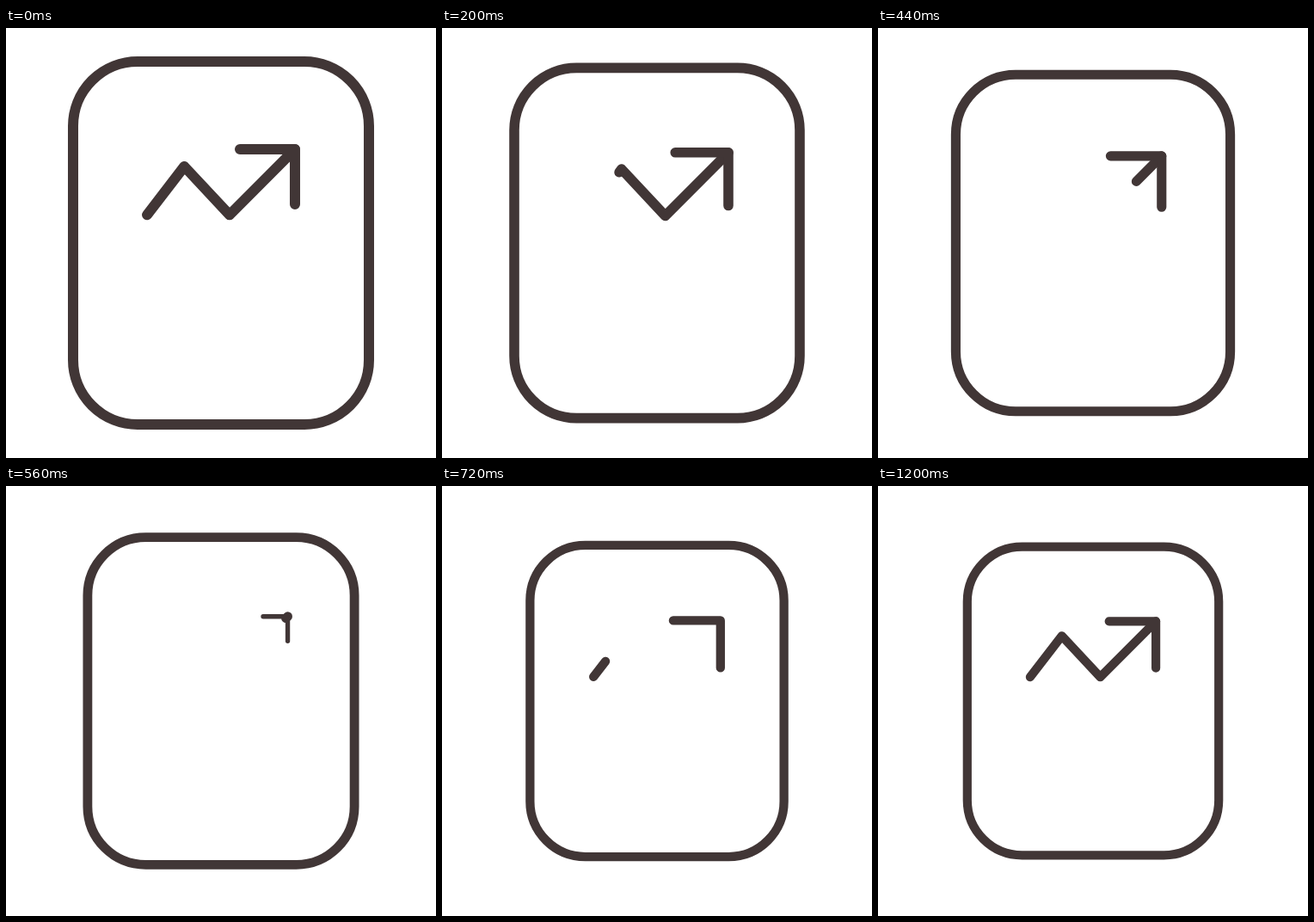
An HTML page that plays this animation: 500 by 500 pixels, repeating every 1500 ms.

```html
<!DOCTYPE html>
<html lang="en">
<head>
<meta charset="utf-8">
<title>Trend icon</title>
<style>
  html, body { margin: 0; height: 100%; overflow: hidden; background: #fff; }
  svg { display: block; width: 100vw; height: 100vh; }
  g { fill: none; stroke: #413636; stroke-width: 12; stroke-linecap: round; stroke-linejoin: round; }
</style>
</head>
<body>
<svg viewBox="0 0 500 500">
  <g id="icon">
    <rect x="78" y="39" width="344" height="422" rx="75"/>
    <polyline id="trend"/>
    <path id="head" d="M272 141H336V205"/>
  </g>
</svg>
<script>
const LOOP = 1500, STEP = 20;
const TIP = [336, 141];
const POINTS = [[164, 217.3], [207.3, 161], [260, 217.3], TIP];
const [icon, trend, head] = ["icon", "trend", "head"].map(id => document.getElementById(id));

const mix = (a, b, k) => a + (b - a) * k;

// Eased progress from time a to time b
function ease(t, a, b) {
  const x = Math.min(1, Math.max(0, (t - a) / (b - a)));
  return x * x * (3 - 2 * x);
}

const lengths = POINTS.slice(1).map((p, i) => Math.hypot(p[0] - POINTS[i][0], p[1] - POINTS[i][1]));
const total = lengths.reduce((a, b) => a + b);

// The part of the trend line between two fractions of its length
function trim(from, to) {
  const start = from * total, end = to * total, out = [];
  if (end <= start) return "";
  let pos = 0;
  lengths.forEach((len, i) => {
    const a = Math.max(start, pos), b = Math.min(end, pos + len);
    if (a < b) for (const s of [a, b]) {
      const k = (s - pos) / len;
      out.push([0, 1].map(c => mix(POINTS[i][c], POINTS[i + 1][c], k)));
    }
    pos += len;
  });
  return out.join(" ");
}

const scaleAbout = (x, y, s) => `translate(${x} ${y}) scale(${s}) translate(${-x} ${-y})`;

function draw(t) {
  const size = 1 - 0.07 * ease(t, 0, 400) - 0.08 * ease(t, 400, 800);
  const headSize = 1 - 0.78 * (ease(t, 500, 600) - ease(t, 600, 700));
  icon.setAttribute("transform", scaleAbout(250, 250, size));
  head.setAttribute("transform", scaleAbout(...TIP, headSize));
  trend.setAttribute("points", t < 600 ? trim(ease(t, 0, 600), 1) : trim(0, ease(t, 600, 1200)));
}

function tick() {
  draw(Math.floor(performance.now() % LOOP / STEP) * STEP);
  requestAnimationFrame(tick);
}
tick();
</script>
</body>
</html>
```
